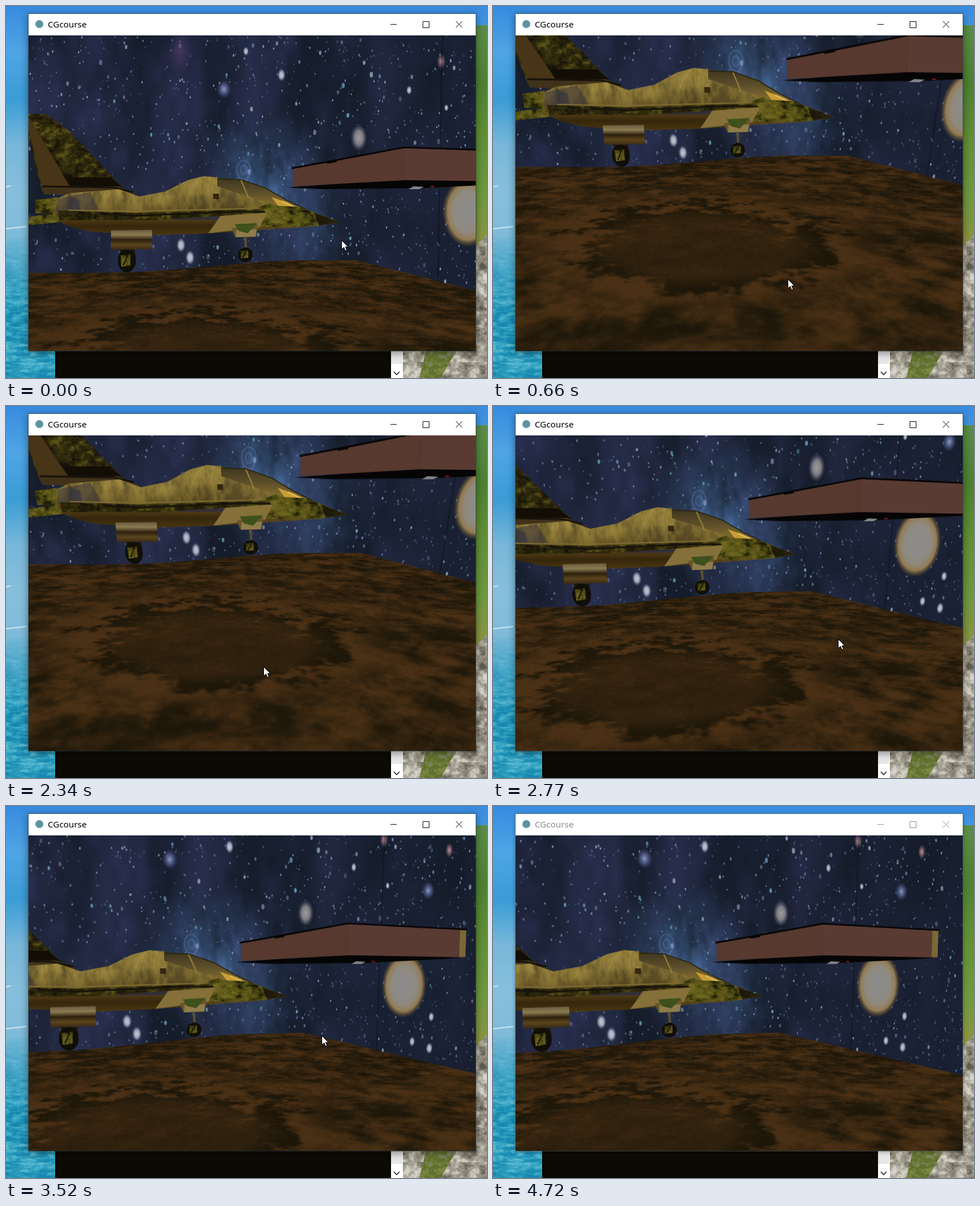
Write an HTML page with a canvas that moves like this. It is 852 px wide and 658 px high and loops after 4820 ms.

```html
<!DOCTYPE html>
<html lang="en">
<head>
<meta charset="utf-8">
<title>CGcourse</title>
<style>
  html, body { margin: 0; width: 852px; height: 658px; overflow: hidden; background: #2a9ab5; }
  body > *, #win > * { position: absolute; }
  #desk, #cursor { left: 0; top: 0; }
  #win { left: 40px; top: 14px; width: 792px; height: 596px; background: #fff;
    box-shadow: 0 0 0 1px #2b3a4299, 0 3px 14px #0007; }
  #win.idle { color: #8c8c8c; box-shadow: 0 0 0 1px #55606699, 0 2px 8px #0005; }
  #win b { left: 12px; top: 11px; width: 14px; height: 14px; border-radius: 50%; background: #5b95a3; }
  #win span { left: 34px; top: 7px; font: 15.3px/22px "Noto Sans", sans-serif; }
  #win svg { left: 640px; top: 11px; fill: none; stroke: currentColor; }
  #view { left: 0; top: 38px; width: 792px; height: 558px; overflow: hidden; background: #1b2338; }
  #scene { position: absolute; left: -100px; top: -12px; transform-origin: 496px 291px; }
</style>
</head>
<body>
<canvas id="desk" width="852" height="658"></canvas>
<div id="win">
  <b></b><span>CGcourse</span>
  <svg width="140" height="16"><path d="M1 7.500h11M58.500 2.500h11v11h-11zM117 2l11 11m0-11l-11 11"/></svg>
  <div id="view"><canvas id="scene" width="1120" height="850"></canvas></div>
</div>
<svg id="cursor" width="16" height="24">
  <path d="M.5.500v16l4-3.500 2.500 6 2.600-1-2.500-6h5z" fill="#fff" stroke="#000"/>
</svg>
<script>
const $ = id => document.getElementById(id);
const clamp = v => Math.max(0, Math.min(1, v));
const mix = (a, b, t) => a + (b - a) * t;
const ramp = (v, a, b) => clamp((v - a) / (b - a));
const ease = v => v * v * (3 - 2 * v);
const bump = (v, centre, width) => Math.exp(-(((v - centre) / width) ** 2));
const hash = (x, y) => { const s = Math.sin(x * 127.1 + y * 311.7) * 43758.5453; return s - Math.floor(s); };
let seed = 7;
const rnd = (a = 0, b = 1) => mix(a, b, (seed = seed * 16807 % 2147483647) / 2147483647);

function noise(x, y) {
  const i = Math.floor(x), j = Math.floor(y), u = ease(x - i), v = ease(y - j);
  return mix(mix(hash(i, j), hash(i + 1, j), u), mix(hash(i, j + 1), hash(i + 1, j + 1), u), v);
}
const fbm = (x, y) => noise(x, y) * .5 + noise(x * 2.3, y * 2.3) * .3 + noise(x * 5.1, y * 5.1) * .2;

function pixels(g, w, h, color) {
  const img = g.createImageData(w, h);
  for (let i = 0; i < w * h; i++) img.data.set([...color(i % w, Math.floor(i / w)), 255], i * 4);
  g.putImageData(img, 0, 0);
}

// Drawing helpers bound to one canvas
function painter(g) {
  const trace = p => {
    g.beginPath();
    for (let i = 0; i < p.length; i += 2) g.lineTo(p[i], p[i + 1]);
  };
  return {
    poly(fill, ...p) { trace(p); g.fillStyle = fill; g.fill(); },
    line(color, width, ...p) { trace(p); g.strokeStyle = color; g.lineWidth = width; g.stroke(); },
    oval(fill, x, y, rx, ry) { g.fillStyle = fill; g.beginPath(); g.ellipse(x, y, rx, ry, 0, 0, 7); g.fill(); },
    glow(x, y, rx, ry, ...stops) {
      g.save(); g.translate(x, y); g.scale(rx, ry);
      const f = g.createRadialGradient(0, 0, 0, 0, 0, 1);
      stops.forEach((c, i) => f.addColorStop(i / (stops.length - 1), c));
      g.fillStyle = f; g.fillRect(-1, -1, 2, 2); g.restore();
    },
    fade(y0, y1, ...stops) {
      const f = g.createLinearGradient(0, y0, 0, y1);
      stops.forEach((c, i) => f.addColorStop(i / (stops.length - 1), c));
      return f;
    },
    // Mottled fill running through the given colours
    camo(sx, sy, ...colors) {
      const rgb = colors.map(c => [1, 3, 5].map(i => parseInt(c.slice(i, i + 2), 16)));
      const tile = new OffscreenCanvas(620, 210), last = rgb.length - 1;
      pixels(tile.getContext('2d'), 620, 210, (x, y) => {
        const t = clamp((fbm(x / sx, y / sy) - .5) * 2 + .5 + (hash(x, y) - .5) * .2) * last;
        const i = Math.min(last - 1, Math.floor(t));
        return rgb[i].map((v, k) => mix(v, rgb[i + 1][k], t - i));
      });
      return g.createPattern(tile, 'repeat');
    }
  };
}

const horizon = x => 471 - 22 * ease(ramp(x, 180, 540)) + Math.max(0, x - 620) * .255;

function groundColor(x, y) {
  const d = y - 360, u = (x - 400) / d, v = 750 / d;
  const n = fbm(u * 6 + 40, v * 6), ring = Math.hypot((x - 356) / 225, (y - 635) / 82) + (n - .5) * .8;
  let t = .47 + (n - .5) * 1.9 + (noise(u * 2, v * 2 + 7) - .5) * .6;
  t = mix(t, .42, .75 * ramp(ring, .9, .7));
  t += .32 * bump(ring, 1.25, .16) - .4 * bump(ring, .95, .14) + (hash(x, y) - .5) * .4;
  t = clamp(t);
  return [mix(30, 74, t), mix(23, 48, t), mix(9, 21, t)];
}

function skyColor(x, y) {
  const t = clamp((fbm(x / 75 + 9, y / 150) - .25) * 1.8) * mix(1, .35, ramp(x, 560, 780));
  const mist = fbm(x / 28, y / 55) * (bump(x, 450, 65) * bump(y, 310, 75) * 1.3 + bump(x, 535, 60) * bump(y, 400, 120) * .6);
  return [21 + t * 21 + mist * 42, 28 + t * 20 + mist * 66, 42 + t * 38 + mist * 95];
}

function paintSky(g, p) {
  for (let i = 0; i < 1900; i++) {
    const x = rnd(-60, 1060), y = rnd(40, 560), r = rnd(.5, 1.3) + rnd() ** 9 * 1.7;
    if (y < horizon(x)) p.oval(`rgba(${rnd(110, 185)},${rnd(150, 195)},${rnd(185, 220)},${rnd(.25, .8)})`, x, y, r, r * 1.7);
  }
  const bright = [[488, 122, 7], [425, 80, 5], [714, 149, 5], [780, 180, 4], [310, 423, 8], [326, 445, 8],
    [837, 472, 6], [873, 486, 7], [875, 425, 6]];
  for (const [x, y, r] of bright) p.glow(x, y, r, r * 1.6, '#c4c9d2', '#b4bccae0', '#8490b000');
  for (const x of [771, 901]) p.glow(x, x / 10 + 21, 8, 14, '#b89aa0', '#8a6470bb', '#60506000');
  for (const x of [386, 861]) p.glow(x, 115 + x / 12, 13, 17, '#8f9bc0', '#6570a899', '#48508000');
  p.glow(308, 80, 24, 42, '#6a488088', '#4a407000');
  p.glow(625, 233, 15, 24, '#a09c98', '#85838aee', '#50567000');
  g.strokeStyle = '#7186b840'; g.lineWidth = 3;
  for (let r = 8; r < 20; r += 9) { g.beginPath(); g.ellipse(421, 290, r * .7, r, 0, 0, 7); g.stroke(); }
  p.line('#0a0e1455', 3, 773, 40, 765, 488);
  p.glow(818, 364, 45, 62, '#8d8b89', '#8d8b89', '#8e8b86', '#8f897d', '#927b53', '#6a502800');
}

function paintSlab(p) {
  p.poly('#060505', 497, 321, 708, 306, 942, 310, 905, 314, 740, 322, 560, 324);
  p.poly('#57392f', 508, 287, 705, 250, 708, 308, 508, 319);
  p.poly('#5a3b33', 705, 250, 942, 258, 942, 311, 708, 308);
  p.poly('#7a6836', 929, 259, 942, 259, 942, 310, 929, 310);
  p.line('#070606', 3, 506, 287, 572, 275, 705, 250, 943, 258);
  p.poly('#070606', 566, 275, 586, 271, 586, 276, 569, 279);
  p.poly('#85868a', 722, 319, 740, 320, 732, 324, 713, 324);
  p.poly('#c01515', 750, 320, 755, 318, 760, 320);
}

function paintJet(p) {
  const dark = p.camo(13, 9, '#15120a', '#2a240a', '#332d0d', '#585019');
  const green = p.camo(14, 9, '#1f1d08', '#45430f', '#5e5718', '#6f6622');
  const skin = p.camo(16, 34, '#5d4f28', '#75652f', '#8a7637', '#9c883f');

  // Tail fin with rudder
  p.poly(dark, 15, 130, 40, 190, 73, 192, 113, 222, 205, 320, 236, 337, 64, 328);
  p.poly('#483416', 28, 176, 74, 252, 112, 318, 63, 318, 40, 216);
  p.poly('#120e05', 104, 303, 186, 303, 206, 321, 113, 318);
  p.poly('#40321a', 64, 319, 200, 319, 236, 337, 66, 333);
  p.line('#17120a', 3, 64, 319, 190, 321, 225, 329);

  // Fuselage
  p.poly(green, 52, 343, 92, 338, 92, 367, 52, 367);
  p.poly(green, -20, 384, 40, 373, 110, 363, 175, 373, 97, 382, -20, 394);
  const body = [85, 365, 90, 341, 112, 331, 200, 324, 236, 337, 282, 328, 322, 308, 350, 301, 374, 303,
    440, 338, 515, 353, 592, 383, 540, 390, 360, 402, 260, 405, 150, 399, 100, 384];
  p.poly(skin, ...body);
  p.poly(p.fade(300, 404, '#40301000', '#40301000', '#34240a66', '#2c1c06aa'), ...body);
  p.poly('#3f3a3a99', 90, 341, 150, 329, 165, 362, 88, 364);
  p.poly('#2f2e4488', 112, 336, 130, 343, 132, 362, 110, 362);

  // Belly and wing
  p.poly(p.fade(374, 404, '#55401a', '#36270b', '#48340f'), 95, 378, 380, 370, 358, 402, 260, 405, 150, 399, 110, 389);
  p.poly('#322e3a', 300, 373, 380, 370, 374, 378, 296, 378);
  p.poly('#85703a', 381, 371, 465, 362, 450, 391, 358, 402);
  p.poly(dark, 92, 362, 230, 366, 460, 359, 482, 364, 385, 371, 260, 379, 95, 379);
  p.line('#7c6c32', 2, 110, 361, 230, 363, 440, 358);
  p.line('#17120a', 3, 170, 368, 228, 371, 400, 364, 478, 364);

  // Nose and canopy
  p.poly(green, 448, 356, 470, 347, 525, 357, 592, 383, 540, 390, 450, 390, 462, 367);
  p.poly('#17110acc', 545, 365, 592, 383, 555, 388);
  p.poly(p.fade(306, 356, '#40371f', '#5e502b', '#8a7130'), 374, 304, 416, 307, 460, 322, 517, 355, 480, 353, 374, 319);
  p.line('#9c8238', 2, 416, 308, 430, 340);
  p.line('#262010', 1.5, 376, 306, 416, 307, 460, 322, 496, 343, 530, 359);
  p.poly('#c99e35', 470, 338, 496, 347, 513, 355, 482, 353);
  p.line('#e3c05b', 2, 488, 345, 508, 354);
  p.poly('#33260f', 367, 332, 377, 332, 377, 342, 367, 341);

  // Landing gear
  const wheel = (x, y, rx, ry) => {
    p.oval('#100e07', x, y, rx, ry);
    p.poly(green, x - rx * .7, y - ry * .5, x + rx * .4, y - ry * .6, x + rx * .4, y + ry * .4, x - rx * .6, y + ry * .5);
    p.line('#151207', 2, x + rx * .1, y - ry * .5, x - rx * .4, y + ry * .4);
  };
  p.poly('#1c160a', 202, 431, 228, 431, 230, 445, 204, 445);
  p.poly(p.fade(396, 431, '#675b3c', '#8a7b52', '#2d200c', '#5b451e', '#39290f'), 186, 397, 259, 396, 259, 430, 186, 431);
  wheel(214, 451, 16, 20);
  p.poly('#6a5526', 400, 393, 446, 386, 443, 408, 406, 409);
  p.poly('#8f7c4b', 408, 396, 444, 395, 442, 408, 407, 409);
  p.poly('#3e501b', 405, 386, 445, 384, 428, 402, 412, 398);
  p.line('#5c5030', 4, 424, 408, 425, 431);
  wheel(424, 440, 13, 13);
}

function paintScene() {
  const g = $('scene').getContext('2d'), p = painter(g);
  pixels(g, 1120, 850, (i, j) => {
    const x = i - 60, y = j + 40;
    return y > horizon(x) ? groundColor(x, y) : skyColor(x, y);
  });
  g.translate(60, -40);
  paintSky(g, p);
  paintSlab(p);
  paintJet(p);
}

function paintDesk() {
  const p = painter($('desk').getContext('2d'));
  const rect = (fill, x0, y0, x1, y1) => p.poly(fill, x0, y0, x1, y0, x1, y1, x0, y1);
  const rock = p.camo(16, 14, '#5f5c50', '#8b8678', '#aaa699', '#d8d4ca');
  const grass = p.camo(18, 14, '#8d8878', '#6f7a3c', '#5a6e28', '#7d8745');
  rect(p.fade(0, 410, '#378be0', '#4fa5e4', '#3a9cd6', '#78b7d9', '#86bfdc', '#7fbbd8'), 0, 0, 852, 410);
  rect('#3a8de0', 40, 0, 852, 14);
  rect(p.camo(16, 5, '#1683ad', '#2196b8', '#3aa6c4', '#5cb9cf'), 0, 410, 88, 658);
  rect(p.fade(400, 540, '#7fbbd8', '#43a3c900'), 0, 400, 40, 540);
  p.line('#cfe6ee', 2, 0, 320, 9, 318);
  p.line('#cfe6ee', 2, 0, 394, 36, 390);
  rect(p.fade(34, 430, '#5b8d4a', '#4c8131', '#628f35', '#6d993f', '#8f9440'), 831, 34, 852, 430);
  p.poly(rock, 700, 606, 831, 606, 831, 425, 852, 405, 852, 658, 700, 658);
  p.poly(grass, 745, 606, 800, 606, 770, 658, 732, 658);
  rect('#0c0a05', 87, 600, 682, 658);
  rect('#fff', 682, 600, 703, 658);
  rect('#e6e6e6', 682, 600, 702, 633);
  p.line('#505050', 2, 687, 647, 692, 652, 697, 647);
}

const LOOP = 4820, TICK = 130, IDLE = 4720, EYE = 674;

// Camera turn in radians: look down, pause, swing right while rising
const yaw = t => -.014 * ramp(t, 270, 650) + .094 * ramp(t, 2340, 2730) + .055 * ramp(t, 2730, 3510) + .03 * ramp(t, 3510, 3770);
const pitch = t => .273 * ramp(t, 270, 650) + .007 * ramp(t, 650, 910) - .1035 * ramp(t, 2340, 2730) - .11 * ramp(t, 2730, 3510);

// Pointer stops: [time, x, y]
const POINTER = [[0, 594, 414], [130, 743, 320], [260, 545, 375], [650, 522, 483], [1560, 522, 484],
  [2340, 456, 461], [2730, 611, 412], [3510, 559, 406], [3900, 711, 607], [4030, 900, 700]];

function pointer(t) {
  const i = POINTER.findLastIndex(s => s[0] <= t), a = POINTER[i], b = POINTER[i + 1] || a;
  const k = b === a ? 0 : ramp(t, a[0], b[0]);
  return `${mix(a[1], b[1], k)}px, ${mix(a[2], b[2], k)}px`;
}

function tick() {
  const now = performance.now() % LOOP, t = Math.floor(now / TICK) * TICK;
  // Turn the painted plane around the viewer's eye
  $('scene').style.transform = `perspective(${EYE}px) translateZ(${EYE}px) rotateX(${-pitch(t)}rad) rotateY(${yaw(t)}rad) translateZ(${-EYE}px)`;
  $('cursor').style.transform = `translate(${pointer(t)})`;
  $('win').className = now >= IDLE ? 'idle' : '';
  requestAnimationFrame(tick);
}

paintDesk();
paintScene();
tick();
</script>
</body>
</html>
```
